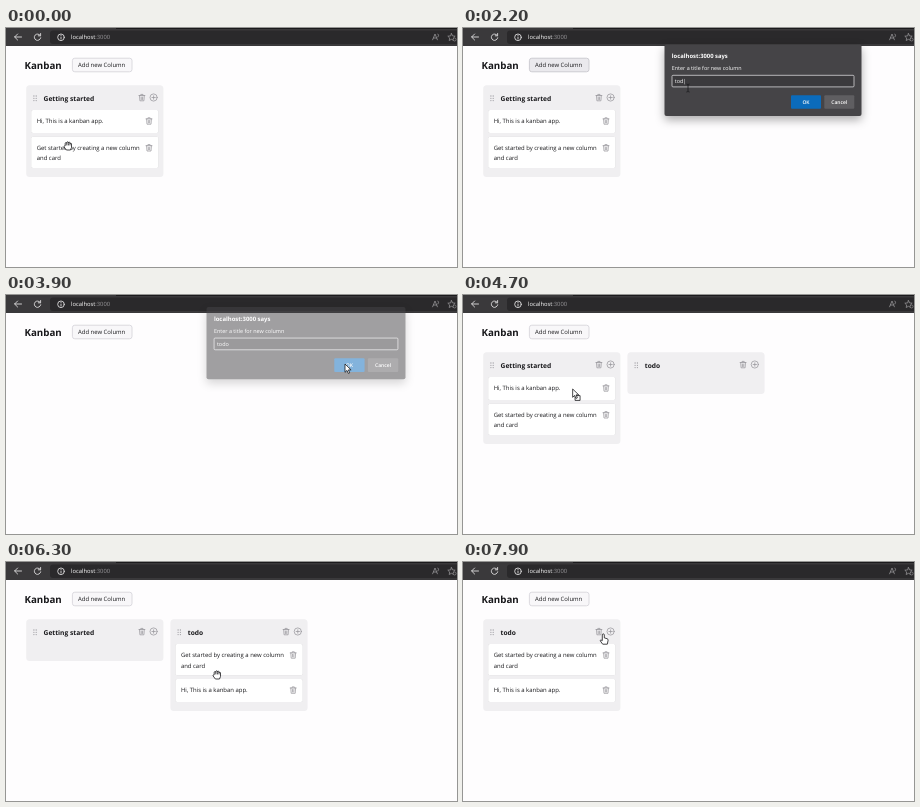
Write an HTML page that moves like this. It is 451 by 239 pixels and loops after 8000 ms.

```html
<!DOCTYPE html>
<html lang="en">
<head>
<meta charset="utf-8">
<title>Kanban board</title>
<style>
  html, body { margin: 0; width: 451px; height: 239px; overflow: hidden; background: #fefdfe; }
  svg { display: block; width: 451px; height: 239px; }
  text {
    font: 500 5.95px "Open Sans", "Noto Sans", sans-serif;
    text-rendering: geometricPrecision;
    fill: #18181b;
    white-space: pre;
  }
  .logo { font-size: 9.75px; font-weight: 700; }
  .heading { font-size: 6.65px; font-weight: 700; }
  .url { font-size: 5.79px; font-weight: 400; fill: #fff; }
  .url tspan { fill: #98979a; }
  .button { fill: #f8f7f9; stroke: #d3d2d8; stroke-width: .8; }
  .button.hover { fill: #eae9ed; stroke: #c4c3ca; }
  .column { fill: #f0eff1; }
  .card { fill: #fff; filter: drop-shadow(0 .7px .7px rgba(0, 0, 0, .2)); }
  .icon { fill: none; stroke: #98979c; stroke-width: .75; stroke-linecap: round; stroke-linejoin: round; }
  .dots { fill: #a09fa4; }
  .bar .icon { stroke: #deddde; stroke-width: .9; }
  .bar .dim { stroke: #9a999b; stroke-width: .75; }
  .dialog { filter: drop-shadow(0 4px 5px rgba(0, 0, 0, .32)); }
  .dialog text { fill: #fff; font-size: 5.42px; font-weight: 400; }
  .dialog .says { font-size: 5.87px; font-weight: 700; }
  .dialog .label { font-size: 5px; font-weight: 600; text-anchor: middle; }
  .cursor path, .cursor rect { fill: #fff; stroke: #19191b; stroke-width: .8; stroke-linejoin: round; }
  .cursor .line { fill: none; stroke-width: .8; }
</style>
</head>
<body>
<svg viewBox="0 0 451 239">
  <g class="bar">
    <rect width="451" height="18" fill="#3a393b"/>
    <rect x="110" width="341" height="1" fill="#1b1a1c"/>
    <rect x="44" y="2.5" width="420" height="13.5" rx="3" fill="#2a292b"/>
    <path class="icon" d="M15.5 9H8.7M11.6 6 8.6 9l3 3"/>
    <path class="icon" d="M34.2 7.4a3.2 3.2 0 1 0 .5 2.4M34.6 5.5v2.3h-2.3"/>
    <g class="icon"><circle cx="55" cy="9.3" r="3.3"/><path d="M55 9v2M55 7.4v.1"/></g>
    <text class="url" x="65" y="11.4">localhost<tspan>:3000</tspan></text>
    <path class="icon dim" d="M426.6 11.8 429 6l2.4 5.8M427.5 10h3M432 6q1.4 1 0 3"/>
    <path class="icon dim" d="m445.5 5.6 1.1 2.3 2.6.3-1.9 1.8.5 2.5-2.3-1.2-2.3 1.2.5-2.5-1.9-1.8 2.6-.3z"/>
    <circle cx="448.6" cy="11.5" r="1.5" fill="#2a292b" stroke="#9a999b" stroke-width=".6"/>
  </g>
  <text class="logo" x="18.5" y="41">Kanban</text>
  <rect id="add" class="button" x="66.4" y="30.2" width="59.6" height="13.6" rx="2.4"/>
  <text x="72" y="39.3">Add new Column</text>
  <g id="board"></g>
  <g id="dialog" class="dialog">
    <rect x="201.5" y="16.5" width="197" height="71.5" rx="2" fill="#454447"/>
    <text class="says" x="208.8" y="30">localhost:3000 says</text>
    <text x="208.8" y="41.8">Enter a title for new column</text>
    <rect x="209" y="47.3" width="182" height="11.6" rx="1" fill="#3b3a3d" stroke="#d5d4d6" stroke-width=".8"/>
    <text id="field" x="211.8" y="55"></text>
    <rect x="328" y="67.2" width="30" height="13.6" rx="1" fill="#0b6bbb"/>
    <rect x="361.3" y="67.2" width="30" height="13.6" rx="1" fill="#5f5e61"/>
    <text class="label" x="343" y="75.9">OK</text>
    <text class="label" x="376.3" y="75.9">Cancel</text>
  </g>
  <g id="cursor" class="cursor"></g>
</svg>
<script>
const LOOP = 8000, STEP = 100;
const $ = id => document.getElementById(id);

const hi = ["Hi, This is a kanban app."];
const intro = ["Get started by creating a new column", "and card"];
const started = (...cards) => ({ title: "Getting started", cards });
const todo = (...cards) => ({ title: "todo", cards });

// Each entry holds from its time until the next one.
const boards = [
  [0, [started(hi, intro)]],
  [3900, []],
  [4000, [started(hi, intro), todo()]],
  [5000, [started(intro), todo(hi)]],
  [6000, [started(), todo(intro, hi)]],
  [7600, [todo(intro, hi)]]
];
const typed = [[0, "|"], [1900, "t|"], [2000, "to|"], [2200, "tod|"], [2400, "todo|"], [3100, "todo"]];
const fades = [[0, 0], [900, .72], [1000, 1], [3900, .5], [4000, 0]];

// time, hotspot x, y, shape until the next entry
const moves = [
  [0, 62, 118, "grab"], [100, 62, 118, "grab"], [300, 88, 60, "arrow"],
  [400, 98, 38, "point"], [700, 100, 38, "point"], [900, 161.5, 48, "point"],
  [1000, 185, 52, "arrow"], [1200, 225, 58, "beam"], [1500, 225, 60, "beam"],
  [2700, 225, 60, "beam"], [2900, 262, 64, "arrow"], [3300, 339, 69, "arrow"],
  [4000, 339, 69, "arrow"], [4400, 62, 96, "grab"], [4600, 62, 96, "drag"],
  [4900, 205, 90, "drag"], [5000, 205, 90, "arrow"], [5300, 70, 98, "grab"],
  [5500, 70, 98, "drag"], [5700, 166, 101, "drag"], [5900, 211, 109, "drag"],
  [6000, 211, 110, "grab"], [6300, 211, 113, "grab"], [6700, 211, 113, "arrow"],
  [7200, 136, 69, "point"], [7600, 137, 70, "point"], [7900, 140.3, 72, "point"],
  [8000, 140.3, 72, "point"]
];

const arrow = '<path d="M0 0v8.3l2-1.9 1.3 3 1.4-.6-1.3-2.9h2.7z"/>';
const shapes = {
  arrow,
  drag: '<rect x="2.4" y="6.6" width="5" height="4.8"/>' + arrow,
  beam: '<path class="line" d="M-1.6-4q1.4 0 1.6.7Q.2-4 1.6-4M0-3.3v6.6M-1.6 4Q-.2 4 0 3.3.2 4 1.6 4"/>',
  point: '<path d="M-1 .9a1 1 0 0 1 2 0v3l2.8.8q1.2.4 1 1.6L4 10.2H-.6L-3.2 6.6q.6-1.3 2.2 0z"/>',
  grab: '<path d="M-2.8-.2v-2.4a.8.8 0 0 1 1.6 0v-.8a.8.8 0 0 1 1.6 0V-3a.8.8 0 0 1 1.6 0v1a.75.75 0 0 1 1.5 0v3.5L2.5 4h-4.1L-4 .8q.2-1.4 1.2-1z"/>' +
    '<path class="line" d="M-1.2-2.6v2M.4-2.8v2.2M2-2.2v1.6"/>'
};

const indexAt = (list, t) => list.findLastIndex(item => item[0] <= t);
const valueAt = (list, t) => list[indexAt(list, t)][1];

const trash = (x, y) => `<path class="icon" transform="translate(${x} ${y})"
  d="M-3-2.1h6M-1.1-2.1v-1.1h2.2v1.1M-2.4-2.1l.4 5.3h4l.4-5.3M-.7-.6l.1 2.5M.7-.6l-.1 2.5"/>`;

function cardMarkup(lines, x, y) {
  const height = lines.length > 1 ? 31.3 : 23;
  const text = lines.map((line, i) => `<text x="${x + 10.5}" y="${y + 13 + i * 10.5}">${line}</text>`);
  return {
    height,
    markup: `<rect class="card" x="${x + 5}" y="${y}" width="127.3" height="${height}" rx="1.8"/>` +
      text.join("") + trash(x + 122.8, y + 11)
  };
}

function columnMarkup({ title, cards }, index) {
  const x = 20.2 + index * 144.2;
  let y = 82, body = "", bottom = 90;
  for (const lines of cards) {
    const card = cardMarkup(lines, x, y);
    body += card.markup;
    bottom = y + card.height;
    y = bottom + 3.8;
  }
  let dots = "";
  for (let i = 0; i < 6; i++) {
    dots += `<circle cx="${x + 7.7 + i % 2 * 2.3}" cy="${68 + (i >> 1) * 2.3}" r=".65"/>`;
  }
  return `<rect class="column" x="${x}" y="57.2" width="137.2" height="${bottom + 9 - 57.2}" rx="3.5"/>
    <g class="dots">${dots}</g>
    <text class="heading" x="${x + 17.4}" y="72.6">${title}</text>
    ${trash(x + 115.7, 69.6)}
    <g class="icon"><circle cx="${x + 127.4}" cy="69.5" r="3.6"/><path d="M${x + 125.7} 69.5h3.4m-1.7-1.7v3.4"/></g>
    ${body}`;
}

function drawCursor(t) {
  const i = indexAt(moves, t);
  const [t0, x0, y0, shape] = moves[i];
  const [t1, x1, y1] = moves[i + 1];
  const k = (t - t0) / (t1 - t0);
  $("cursor").innerHTML = shapes[shape];
  $("cursor").setAttribute("transform", `translate(${x0 + (x1 - x0) * k} ${y0 + (y1 - y0) * k})`);
}

function drawDialog(t) {
  const alpha = valueAt(fades, t);
  const lifted = alpha < 1;
  $("dialog").style.opacity = alpha;
  $("dialog").setAttribute("transform", lifted ? "translate(-3 -4.7) scale(1.01)" : "");
  $("field").textContent = valueAt(typed, t);
}

function draw(t) {
  $("board").innerHTML = valueAt(boards, t).map(columnMarkup).join("");
  $("add").classList.toggle("hover", t >= 400 && t < 3900);
  drawDialog(t);
  drawCursor(t);
}

const start = performance.now();
let last = -1;
function tick() {
  const t = Math.floor((performance.now() - start) % LOOP / STEP) * STEP;
  if (t !== last) draw(last = t);
  requestAnimationFrame(tick);
}
tick();
</script>
</body>
</html>
```
